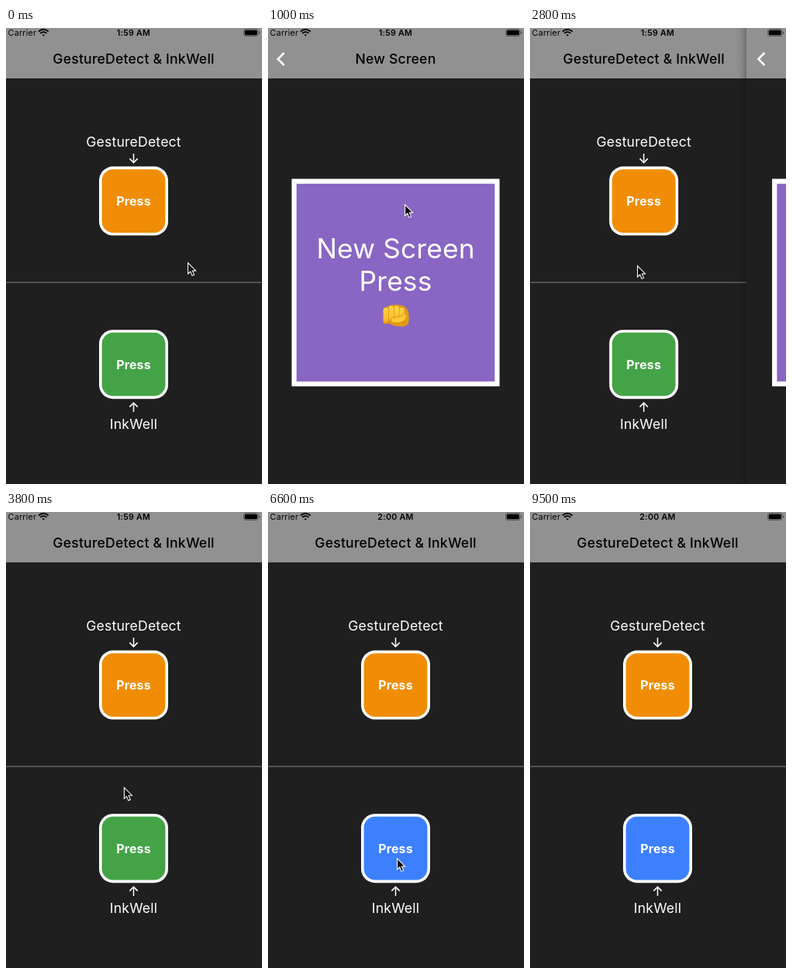
These frames come from a looping animation (330 by 588 pixels, 9600 ms). An HTML page with a canvas:

```html
<!DOCTYPE html>
<html lang="en">
<head>
<meta charset="utf-8">
<title>Tap demo</title>
<style>
html, body { margin: 0; width: 100%; height: 100%; overflow: hidden; background: #1f1f1f; }
canvas { display: block; width: 330px; height: 588px; }
</style>
</head>
<body>
<canvas id="stage"></canvas>
<script>
const W = 330, H = 588, LOOP = 9600, STEP = 100;
const SCREEN_X = -3, SCREEN_W = 335;   // the phone screen is slightly wider than the stage
const MID = 164.5;
const BG = '#1f1f1f', BAR = '#919191';
const GREEN = '#44a347', CYAN = '#4ab3d0', BLUE = '#3c80ff', ORANGE = '#f08d05', PURPLE = '#8965c4';

const canvas = document.getElementById('stage');
const ctx = canvas.getContext('2d');
const dpr = window.devicePixelRatio || 1;
canvas.width = W * dpr;
canvas.height = H * dpr;

const PUSH = 450, POP = 2605, SLIDE = 500;
const CLOCK_TICK = 4600;
const CURSOR_OFF = 9500;
const taps = [[4600, CYAN], [5600, BLUE], [6700, GREEN], [7300, CYAN], [8300, BLUE]];
const cursorPath = [
  [0, 234, 302], [100, 234, 302], [450, 176, 227], [1050, 176, 227],
  [1800, 35, 52], [2100, 28, 43], [2350, 28, 43], [2800, 138, 306],
  [3300, 96, 120], [3500, 96, 120], [4000, 182, 482], [4250, 182, 482],
  [4600, 166, 456], [5200, 164, 454], [6600, 166, 446], [7300, 166, 436],
  [8400, 166, 436], [9100, 240, 300]
];

const clamp = v => Math.max(0, Math.min(1, v));
const mix = (a, b, k) => a + (b - a) * k;
const smooth = k => k * k * (3 - 2 * k);
const bez = (a, b, s) => 3 * a * s * (1 - s) ** 2 + 3 * b * s * s * (1 - s) + s ** 3;

// cubic-bezier(.35, .91, .33, .97)
function slideEase(x) {
  if (x <= 0 || x >= 1) return clamp(x);
  let lo = 0, hi = 1;
  for (let i = 0; i < 24; i++) {
    const m = (lo + hi) / 2;
    if (bez(.35, .33, m) < x) lo = m; else hi = m;
  }
  return bez(.91, .97, lo);
}

const pageShown = t => slideEase((t - PUSH) / SLIDE) - slideEase((t - POP) / SLIDE);

function cursorAt(t) {
  for (let i = 1; i < cursorPath.length; i++) {
    const [t1, x1, y1] = cursorPath[i];
    if (t <= t1) {
      const [t0, x0, y0] = cursorPath[i - 1];
      const k = smooth((t - t0) / (t1 - t0));
      return [mix(x0, x1, k), mix(y0, y1, k)];
    }
  }
  return cursorPath[cursorPath.length - 1].slice(1);
}

function rect(x, y, w, h, fill) {
  ctx.fillStyle = fill;
  ctx.fillRect(x, y, w, h);
}

function round(x, y, w, h, r, fill) {
  ctx.beginPath();
  ctx.roundRect(x, y, w, h, r);
  ctx.fillStyle = fill;
  ctx.fill();
}

function line(points, width, color) {
  ctx.beginPath();
  points.forEach(([x, y], i) => i ? ctx.lineTo(x, y) : ctx.moveTo(x, y));
  ctx.lineWidth = width;
  ctx.strokeStyle = color;
  ctx.stroke();
}

function text(str, x, y, size, weight, color, align = 'center', spacing = .2) {
  ctx.font = `${weight} ${size}px Inter, sans-serif`;
  ctx.letterSpacing = spacing + 'px';
  ctx.textAlign = align;
  ctx.fillStyle = color;
  ctx.fillText(str, x, y);
}

function statusBar(t) {
  text('Carrier', 2.6, 10, 10.6, 400, '#000', 'left', .3);
  text(t < CLOCK_TICK ? '1:59 AM' : '2:00 AM', 164.4, 10, 10.6, 600, '#000', 'center', .3);
  for (const r of [3.2, 6.4, 9.6]) {
    ctx.beginPath();
    ctx.arc(48.3, 10.6, r - .9, -Math.PI * .76, -Math.PI * .24);
    if (r < 4) {
      ctx.lineTo(48.3, 10.6);
      ctx.fillStyle = '#000';
      ctx.fill();
    } else {
      ctx.lineWidth = 1.9;
      ctx.strokeStyle = '#000';
      ctx.stroke();
    }
  }
  ctx.beginPath();
  ctx.roundRect(306.5, 1.5, 18.5, 9, 2.4);
  ctx.lineWidth = .8;
  ctx.strokeStyle = '#4a4a4a';
  ctx.stroke();
  round(307.7, 2.7, 16.1, 6.6, 1.5, '#000');
  round(325.9, 4.4, 1.3, 3.2, .7, '#4a4a4a');
}

function arrow(y, dir) {
  line([[MID, y - 6 * dir], [MID, y + 5 * dir]], 1.5, '#fff');
  line([[MID - 5.2, y + .4 * dir], [MID, y + 5.6 * dir], [MID + 5.2, y + .4 * dir]], 1.5, '#fff');
}

function button(y, color, splash) {
  round(120, y, 89, 89, 18, '#fff');
  round(123.6, y + 3.6, 81.8, 81.8, 14.5, color);
  if (splash) {
    ctx.save();
    ctx.clip();
    ctx.beginPath();
    ctx.arc(splash.x, splash.y, splash.r, 0, 7);
    ctx.fillStyle = `rgba(255,255,255,${splash.a})`;
    ctx.fill();
    ctx.restore();
  }
  text('Press', MID, y + 50.6, 15.9, 700, '#fff');
}

function inkState(t) {
  let color = GREEN, splash = null;
  for (const [at, next] of taps) {
    if (t < at) break;
    color = next;
    const age = t - at;
    if (age < 400) {
      const [x, y] = cursorAt(at);
      splash = { x, y, r: 12 + 78 * clamp(age / 300), a: .25 * (1 - age / 400) };
    }
  }
  return [color, splash];
}

function home(t) {
  rect(SCREEN_X, 0, SCREEN_W, H, BG);
  rect(SCREEN_X, 0, SCREEN_W, 65, BAR);
  text('GestureDetect & InkWell', MID, 46, 17.6, 500, '#000');
  text('GestureDetect', MID, 153, 17.6, 400, '#fff');
  arrow(168, 1);
  button(178.6, ORANGE);
  rect(SCREEN_X, 327.6, SCREEN_W, 1, '#858585');
  button(389.2, ...inkState(t));
  arrow(489, -1);
  text('InkWell', MID, 517, 17.6, 400, '#fff');
}

function fist() {
  const skin = ctx.createLinearGradient(0, 357, 0, 386);
  skin.addColorStop(0, '#ffd84a');
  skin.addColorStop(.6, '#fbbd2c');
  skin.addColorStop(1, '#e8930f');
  // wrist and back of the hand
  ctx.beginPath();
  ctx.moveTo(152, 360);
  ctx.bezierCurveTo(160, 355.5, 172, 356, 177, 360);
  ctx.bezierCurveTo(182, 364, 182.5, 374, 181, 381);
  ctx.bezierCurveTo(178, 386, 170, 385.5, 163, 384);
  ctx.lineTo(151, 379);
  ctx.closePath();
  ctx.fillStyle = '#e39a14';
  ctx.fill();
  for (let i = 3; i >= 0; i--) {
    const x = 148.3 + i * 6.8, top = 360.2 - Math.sin(i * 1.05) * 2.4;
    round(x, top, 7.4, 21.5 - i * .5, 3.6, '#cf8210');
    round(x + .4, top + .2, 6.6, 20.5 - i * .5, 3.3, skin);
  }
  // thumb folded across the fingers
  ctx.beginPath();
  ctx.moveTo(176, 367);
  ctx.quadraticCurveTo(174, 372, 166, 372.6);
  ctx.quadraticCurveTo(158.5, 373, 158.3, 376.8);
  ctx.quadraticCurveTo(158.5, 380.5, 164, 380.2);
  ctx.quadraticCurveTo(173, 381.5, 178, 375);
  ctx.quadraticCurveTo(180, 370, 176, 367);
  ctx.fillStyle = '#ffc936';
  ctx.fill();
  ctx.lineWidth = .8;
  ctx.strokeStyle = '#cf8210';
  ctx.stroke();
}

function newScreen() {
  const shade = ctx.createLinearGradient(SCREEN_X - 16.75, 0, SCREEN_X, 0);
  [0, .016, .07, .22].forEach((a, i) => shade.addColorStop(i / 3, `rgba(0,0,0,${a})`));
  rect(SCREEN_X - 16.75, 0, 16.75, H, shade);
  rect(SCREEN_X, 0, SCREEN_W, H, BG);
  rect(SCREEN_X, 0, SCREEN_W, 65, BAR);
  line([[20.8, 32], [12.8, 40], [20.8, 48]], 2.5, '#fff');
  text('New Screen', MID, 46, 17.6, 500, '#000');
  rect(30.5, 194.5, 268, 267.6, '#fff');
  rect(36.8, 200.8, 255.4, 255, PURPLE);
  text('New Screen', MID, 296.6, 35.2, 400, '#fff');
  text('Press', MID, 339.2, 35.2, 400, '#fff');
  fist();
}

function cursor(x, y) {
  ctx.save();
  ctx.translate(x + .6, y + .8);
  ctx.beginPath();
  [[0, 0], [0, 14.2], [3.2, 11.2], [5.4, 16.6], [8, 15.5], [5.7, 10.3], [10, 10.1]]
    .forEach(p => ctx.lineTo(...p));
  ctx.closePath();
  ctx.fillStyle = '#000';
  ctx.fill();
  ctx.lineWidth = 1.1;
  ctx.strokeStyle = '#fff';
  ctx.stroke();
  ctx.restore();
}

function shifted(dx, draw) {
  ctx.save();
  ctx.translate(dx, 0);
  draw();
  ctx.restore();
}

function render(t) {
  ctx.setTransform(dpr, 0, 0, dpr, 0, 0);
  rect(0, 0, W, H, BG);
  const p = pageShown(t);
  if (p < 1) shifted(-p * SCREEN_W / 3, () => home(t));
  if (p > 0) shifted((1 - p) * SCREEN_W, newScreen);
  statusBar(t);
  if (t < CURSOR_OFF) cursor(...cursorAt(t));
}

const start = performance.now();
function tick() {
  const t = (performance.now() - start) % LOOP;
  render(Math.floor(t / STEP) * STEP);
  requestAnimationFrame(tick);
}
tick();
</script>
</body>
</html>
```
